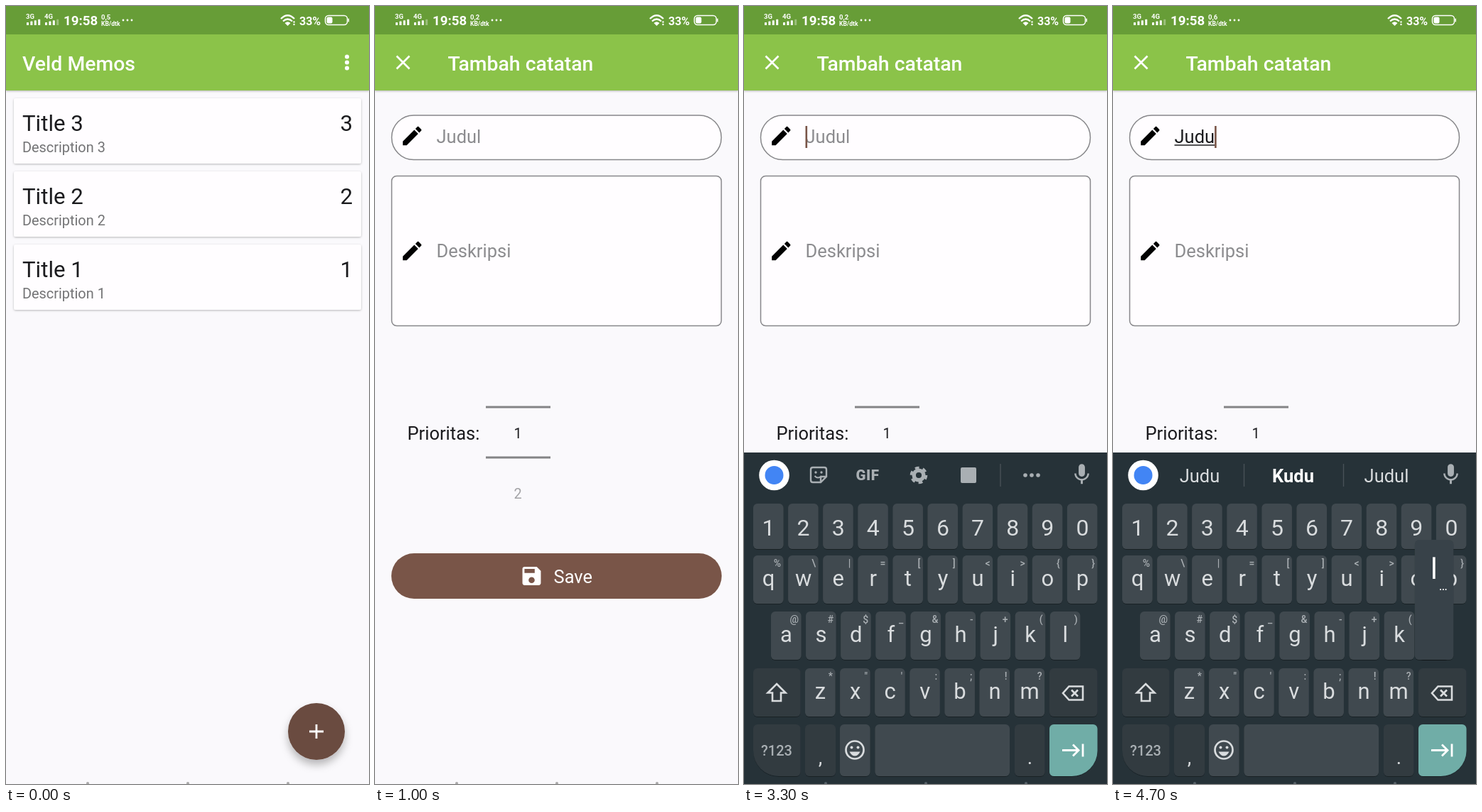
Animation of 511 by 1096 pixels, one loop 5 s. Source, as an HTML page:

```html
<!DOCTYPE html>
<html lang="id">
<head>
<meta charset="utf-8">
<title>Notes app</title>
<style>
html, body { margin: 0; width: 100%; height: 100%; overflow: hidden; background: #faf9fc; }
svg { display: block; width: 100%; height: 100%; font-family: Roboto, sans-serif; }
text { white-space: pre; }
</style>
</head>
<body>
<svg id="stage" viewBox="0 0 511 1096"></svg>
<script>
const LOOP = 5000, STEP = 100, W = 511, H = 1096;
const BROWN = '#795548', LIGHT = '#d9dcde', INK = '#1b1b1e';

const esc = s => s.replace(/&/g, '&amp;').replace(/</g, '&lt;');
const text = (x, y, size, fill, s, attrs = '') =>
  `<text x="${x}" y="${y}" font-size="${size}" fill="${fill}" ${attrs}>${esc(s)}</text>`;
const rect = (x, y, w, h, r, fill, attrs = '') =>
  `<rect x="${x}" y="${y}" width="${w}" height="${h}" rx="${r}" fill="${fill}" ${attrs}/>`;
const dot = (x, y, r, fill, attrs = '') => `<circle cx="${x}" cy="${y}" r="${r}" fill="${fill}" ${attrs}/>`;
const line = (d, stroke, width, attrs = '') =>
  `<path d="${d}" fill="none" stroke="${stroke}" stroke-width="${width}" ${attrs}/>`;
const icon = (d, cx, cy, scale, fill) =>
  `<path d="${d}" fill="${fill}" fill-rule="evenodd" transform="translate(${cx} ${cy}) scale(${scale}) translate(-12 -12)"/>`;
const MID = 'text-anchor="middle"', END = 'text-anchor="end"', BOLD = 'font-weight="700"';

const PENCIL = 'M3 17.25V21h3.75L17.81 9.94l-3.75-3.75L3 17.25zM20.71 7.04c.39-.39.39-1.02 0-1.41l-2.34-2.34c-.39-.39-1.02-.39-1.41 0l-1.83 1.83 3.75 3.75 1.83-1.83z';
const DISK = 'M17 3H5c-1.1 0-2 .9-2 2v14c0 1.1.9 2 2 2h14c1.1 0 2-.9 2-2V7l-4-4zm-5 16c-1.66 0-3-1.34-3-3s1.34-3 3-3 3 1.34 3 3-1.34 3-3 3zm3-10H5V5h10v4z';
const MIC = 'M12 14c1.66 0 3-1.34 3-3V5c0-1.66-1.34-3-3-3S9 3.34 9 5v6c0 1.66 1.34 3 3 3zm5.3-3c0 3-2.54 5.1-5.3 5.1S6.7 14 6.7 11H5c0 3.41 2.72 6.23 6 6.72V21h2v-3.28c3.28-.48 6-3.3 6-6.72h-1.7z';

function statusBar() {
  const bars = x => [0, 1, 2, 3].map(i =>
    rect(x + i * 5.4, 23 - i * 1.4, 3, 4 + i * 1.4, .6, '#fff', x > 50 && i === 3 ? 'opacity=".35"' : '')).join('');
  return rect(0, 0, W, 40, 0, '#679d37') +
    text(28, 17.5, 9.5, '#fff', '3G', BOLD) + text(54, 17.5, 9.5, '#fff', '4G', BOLD) + bars(29) + bars(55) +
    text(81, 27, 18.7, '#fff', '19:58', BOLD) +
    text(134, 19, 9.5, '#fff', '0,5', BOLD + ' id="speed"') + text(134, 27.5, 8.6, '#fff', 'KB/dtk', BOLD) +
    [165, 171, 177].map(x => dot(x, 20, 1.4, '#fff')).join('') +
    line('M387 18Q396.500 8.500 406 18M390 21.500Q396.500 15.500 403 21.500', '#fff', 2.3) +
    '<path d="M392.500 24Q396.500 20.500 400.500 24L396.500 28Z" fill="#fff"/>' +
    dot(405.5, 22.5, 1.2, '#fff') + dot(405.5, 26, 1.2, '#fff') +
    text(413, 26.5, 16, '#fff', '33%', BOLD) +
    rect(449.500, 13.5, 31, 13, 4.5, 'none', 'stroke="#fff" stroke-width="1.5"') +
    rect(451.5, 15.5, 8, 9, 2, '#fff') + rect(481.5, 17.5, 1.5, 5, .7, '#fff');
}

const pane = body => rect(0, 40, W, H - 40, 0, '#faf9fc') +
  rect(0, 40, W, 79, 0, '#8bc34a', 'filter="url(#soft)"') + body;

function listPane() {
  const card = (n, i) => {
    const y = 130 + i * 103;
    return rect(11, y, 489, 92, 3, '#fffdff', 'filter="url(#soft)"') +
      text(23, y + 45.5, 31.2, INK, 'Title ' + n) +
      text(23, y + 75.5, 19.9, '#747476', 'Description ' + n) +
      text(488, y + 45.5, 31.2, INK, String(n), END);
  };
  return pane(text(23, 90.5, 28.4, '#fff', 'Veld Memos', 'font-weight="500"') +
    [71.5, 79.5, 87.5].map(y => dot(480, y, 3, '#fff')).join('') +
    [3, 2, 1].map(card).join('') +
    dot(437, 1022, 40, '#6a4b3f', 'filter="url(#deep)"') +
    dot(437, 1022, 0, '#fff', 'id="ripple" opacity=".2"') +
    line('M427 1022H447M437 1012V1032', '#fff', 2.8));
}

function formPane() {
  const border = 'stroke="#87878a" stroke-width="1.5"';
  return pane(line('M30.500 70.500L48.500 88.500M48.500 70.500L30.500 88.500', '#fff', 2.7) +
    text(102.5, 90.5, 28.4, '#fff', 'Tambah catatan', 'font-weight="500"') +
    rect(23.5, 154, 464, 62.5, 31, '#fffdff', border) +
    rect(23.5, 239.5, 464, 211, 7, '#fffdff', border) +
    icon(PENCIL, 52.3, 183, 1.46, '#000') + icon(PENCIL, 52.3, 345, 1.46, '#000') +
    text(86.5, 193, 25.5, '#8c8c8f', 'Judul', 'id="field"') +
    line('', INK, 1.5, 'id="underline"') + rect(0, 169, 2.6, 31, 0, BROWN, 'id="caret"') +
    text(86.5, 354, 25.5, '#8c8c8f', 'Deskripsi') +
    text(45.5, 610.500, 25.5, INK, 'Prioritas:') +
    line('M156 565H247M156 636H247', '#848486', 3) +
    text(201, 608.5, 19.9, INK, '1', MID) + text(201, 693.5, 19.9, '#a3a3a6', '2', MID) +
    rect(23, 771, 465, 64, 32, BROWN) + icon(DISK, 220.5, 803, 1.44, '#fff') +
    text(251.5, 812.5, 25.5, '#fff', 'Save'));
}

const ROWS = [
  { keys: '1234567890', hints: '', x: 13, y: 701, h: 64, base: 45 },
  { keys: 'qwertyuiop', hints: '%\\|=[]<>{}', x: 13, y: 774, h: 68, base: 42.5 },
  { keys: 'asdfghjkl', hints: '@#$_&-+()', x: 38, y: 853, h: 68, base: 43 },
  { keys: 'zxcvbnm', hints: '*"\':;!?', x: 86, y: 933, h: 68, base: 43 }
];
const keyAt = {};
for (const row of ROWS)
  [...row.keys].forEach((k, i) => keyAt[k] = { x: row.x + i * 49.1, y: row.y });

function keyboard() {
  const KEY = '#414a50', DIM = '#313a40', GREY = '#a9afb3';
  const shade = 'filter="url(#key)"';
  const letters = ROWS.map(r => [...r.keys].map((k, i) => {
    const { x, y } = keyAt[k];
    return rect(x, y, 42.5, r.h, 6, KEY, shade) +
      text(x + 21.5, y + r.base, r.hints ? 31 : 32, LIGHT, k, MID) +
      (r.hints ? text(x + 39, y + 16, 14, GREY, r.hints[i], END + ' font-weight="500"') : '');
  }).join('')).join('');
  const special = rect(13, 933, 66.5, 68, 6, DIM, shade) + rect(430, 933, 67.5, 68, 6, DIM, shade) +
    `<path d="M19 1012H73.500a6 6 0 0 1 6 6V1079a6 6 0 0 1-6 6H49a36 36 0 0 1-36-36V1018a6 6 0 0 1 6-6Z" fill="${DIM}" ${shade}/>` +
    `<path d="M436 1012H491.500a6 6 0 0 1 6 6V1049a36 36 0 0 1-36 36H436a6 6 0 0 1-6-6V1018a6 6 0 0 1 6-6Z" fill="#6fada7" ${shade}/>` +
    rect(86, 1012, 43, 73, 6, DIM, shade) + rect(135, 1012, 42.5, 73, 6, KEY, shade) +
    rect(184.5, 1012, 189.5, 73, 6, KEY, shade) + rect(381, 1012, 42.5, 73, 6, DIM, shade) +
    text(46, 1056, 20, GREY, '?123', MID + ' font-weight="500"') +
    text(107.5, 1068, 28, LIGHT, ',', MID) + text(402.5, 1068, 28, LIGHT, '.', MID) +
    line('M46 955L58.500 967.500H52V979H40V967.500H33.500Z', LIGHT, 2.6) +
    line('M457.500 958.500H477V977.500H457.500L449 968ZM461 963.500L470 972.500M470 963.500L461 972.500', LIGHT, 2.6) +
    dot(156, 1048, 12.5, 'none', `stroke="${LIGHT}" stroke-width="2.7"`) +
    dot(151.500, 1044.5, 2, LIGHT) + dot(160.500, 1044.5, 2, LIGHT) +
    `<path d="M148.500 1050.500H163.500Q160.500 1056.500 156 1056.500T148.500 1050.500Z" fill="${LIGHT}"/>` +
    line('M448 1048.500H470M463 1040.500L471 1048.500L463 1056.500M477 1039.500V1057.500', '#fff', 2.8);
  const tools = '<g id="tools">' +
    line('M97 650H113Q116 650 116 653V663L108 671H97Q94 671 94 668V653Q94 650 97 650ZM116 663H110Q108 663 108 665V671', GREY, 2.4) +
    dot(101, 657, 1.7, GREY) + dot(109, 657, 1.7, GREY) + line('M99.500 662Q104 667 109 662', GREY, 2) +
    text(174, 668, 20.5, GREY, 'GIF', MID + ' font-weight="900" letter-spacing=".5"') +
    dot(246, 661, 6.8, 'none', `stroke="${GREY}" stroke-width="5.500"`) +
    dot(246, 661, 10.6, 'none', `stroke="${GREY}" stroke-width="3.400" stroke-dasharray="5.8 5.3"`) +
    rect(305, 650, 22, 22, 2, GREY) + line('M361 645V677', '#485157', 1.4) +
    [396, 405, 414].map(x => dot(x, 661, 2.8, GREY)).join('') + '</g>';
  const words = '<g id="words">' + line('M184.500 645V677M324.500 645V677', '#485157', 1.4) +
    [122, 253.5, 385].map(x => text(x, 671, 25.5, LIGHT, '', MID)).join('') + '</g>';
  return rect(0, 629, W, 467, 0, '#263238') + dot(42.5, 661, 21.3, '#fff') + dot(42.5, 661, 13, '#4285f4') +
    tools + words + icon(MIC, 475.5, 660, 1.48, GREY) + letters + special +
    '<g id="popup">' + rect(-6, -101, 54.5, 169, 6, '#394248', 'filter="url(#key)"') +
    text(21, -46, 40, '#fff', '', MID) + text(28, -30, 18, '#fff', '…') + '</g>';
}

const shadow = (id, dy, blur, alpha) =>
  `<filter id="${id}" x="-30%" y="-30%" width="160%" height="160%"><feDropShadow dx="0" dy="${dy}" stdDeviation="${blur}" flood-opacity="${alpha}"/></filter>`;

const $ = id => document.getElementById(id);
$('stage').innerHTML =
  `<defs>${shadow('soft', 1, 1.4, .27)}${shadow('deep', 7, 6, .27)}${shadow('key', 1, .7, .35)}
   <clipPath id="left"><rect id="cut" width="${W}" height="${H}"/></clipPath></defs>
   <g id="listClip" clip-path="url(#left)"><g id="list">${listPane()}</g></g>
   <g id="form">${formPane()}</g>
   <g id="keys">${keyboard()}</g>${statusBar()}
   <g id="nav">${[115, 256, 397].map(x => dot(x, 1095, 2, '#aaa')).join('')}</g>
   ${dot(0, 0, 12.5, '#dedbd4', 'id="touch" fill-opacity=".8" stroke="#c8a64f" stroke-width="1.5"')}`;

// [from, to, x, y]
const TOUCHES = [[100, 300, 437, 1024], [1700, 1900, 149, 187]];
// [key, popup shown, letter committed, touch mark gone]
const PRESSES = [['j', 3400, 3600, 3800], ['u', 3900, 4000, 4100], ['d', 4200, 4300, 4400],
  ['u', 4400, 4500, 4600], ['l', 4600, 5000, 5000]];
for (const [k, , commit, gone] of PRESSES)
  TOUCHES.push([commit, gone, keyAt[k].x + 21, keyAt[k].y + 41]);
const WORDS = [[], ['J', 'Jadi', 'Jika'], ['Ju', 'Juga', 'Jual'], ['Jud', 'Judul', 'Judi'], ['Judu', 'Kudu', 'Judul']];

const set = (el, attrs) => { for (const a in attrs) el.setAttribute(a, attrs[a]); };
const show = (id, on) => set($(id), { display: on ? 'inline' : 'none' });
const move = (id, x, y) => set($(id), { transform: `translate(${x} ${y})` });

function render(t) {
  // Screen change: the form glides in from the right and settles
  const left = t < 420 ? 1 : t >= 1000 ? 0 : Math.exp(-(t - 420) / 104);
  const edge = Math.round(W * left);
  move('form', edge, 0);
  show('form', left < 1);
  show('listClip', left > 0);
  move('list', -5.5 * (1 - left), 0);
  set($('cut'), { width: edge });
  set($('ripple'), { r: t >= 100 && t < 500 ? Math.min(40, (t - 50) / 5) : 0 });

  // Typing
  const count = PRESSES.filter(p => t >= p[2]).length;
  const typed = 'Judul'.slice(0, count), field = $('field');
  field.textContent = typed || 'Judul';
  set(field, { fill: typed ? INK : '#8c8c8f' });
  const end = 86.5 + (typed ? field.getComputedTextLength() : 0);
  set($('underline'), { d: typed ? `M86.500 196H${end}` : '' });
  set($('caret'), { x: end });
  show('caret', (t >= 1900 && t < 2300) || t >= 3300);

  // Keyboard
  const up = Math.min(1, Math.max(0, (t - 2100) / 200));
  show('keys', up > 0);
  move('keys', 0, Math.round(467 * (1 - up) ** 2));
  show('tools', !count);
  show('words', count > 0);
  [...$('words').querySelectorAll('text')].forEach((el, i) => {
    const bold = count === 4 && i === 1;
    el.textContent = WORDS[count][i] || '';
    set(el, { 'font-weight': bold ? 700 : 400, fill: bold ? '#fff' : LIGHT });
  });
  const press = PRESSES.find(p => t >= p[1] && t < p[2]);
  show('popup', press);
  if (press) {
    move('popup', keyAt[press[0]].x, keyAt[press[0]].y);
    $('popup').querySelector('text').textContent = press[0];
  }

  const touch = TOUCHES.find(p => t >= p[0] && t < p[1]);
  show('touch', touch);
  if (touch) set($('touch'), { cx: touch[2], cy: touch[3] });

  $('speed').textContent = t < 700 ? '0,5' : t < 4200 ? '0,2' : '0,6';
  const hollow = t >= 2100 && t < 2200;
  for (const d of $('nav').children)
    set(d, { fill: hollow ? '#fff' : up ? '#566067' : '#aaa', stroke: hollow ? '#ddd' : 'none', r: hollow ? 2.5 : 2 });
}

const start = performance.now();
function tick() {
  const t = (performance.now() - start) % LOOP;
  render(Math.floor(t / STEP) * STEP);
  requestAnimationFrame(tick);
}
render(0);
requestAnimationFrame(tick);
</script>
</body>
</html>
```
